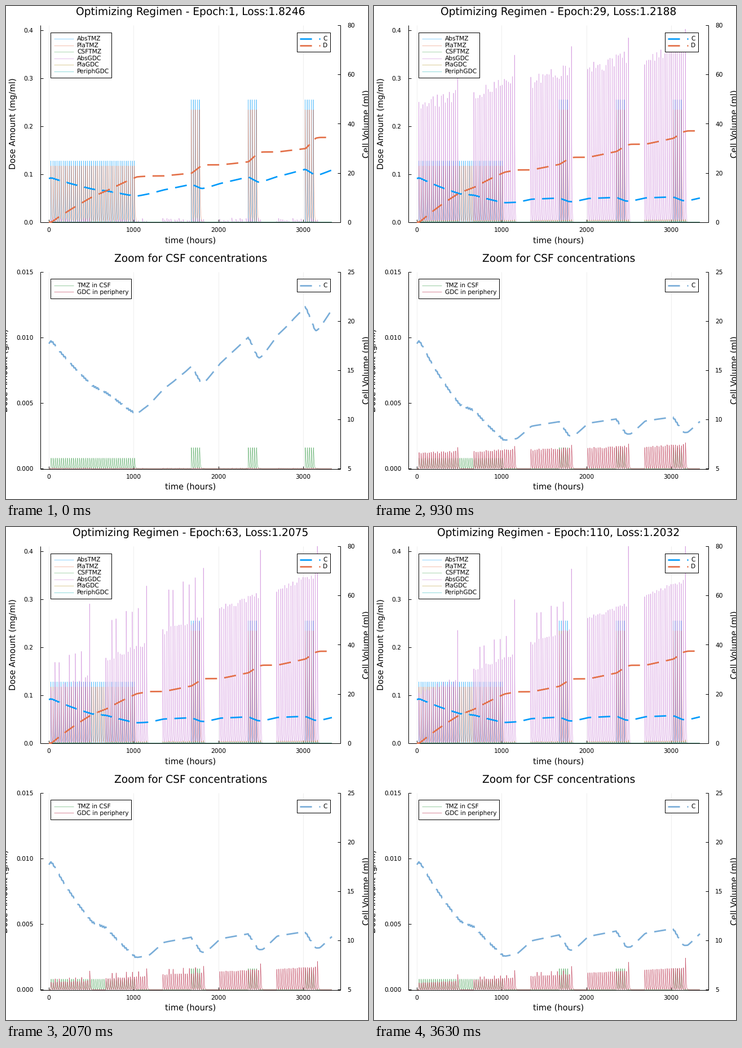
These frames come from a looping animation (642x873 px, 3660 ms). A matplotlib script:

```python
import numpy as np
import matplotlib as mpl
import matplotlib.pyplot as plt
from matplotlib.animation import FuncAnimation
from matplotlib.patches import Rectangle

W, H, DPI = 642, 873, 96
STEP, FRAMES = 20, 183            # ms per frame, frames per loop
N_EPOCHS = 110
LEFT, RIGHT = 61, 593
TOP_Y = (34.2, 382.7)
LOW_Y = (470.7, 819.2)
XLIM = (-100.2, 3440.2)
THIN = 0.5
DASH = (0, (7.9, 4.85))

BLUE, ORANGE, GREEN, PURPLE, OLIVE, TEAL = PALETTE = [
    "#009afa", "#e36f47", "#3ea44e", "#c371d2", "#ac8e18", "#00aaae"]
STEEL, TMZ_GREEN, GDC_RED = "#79add8", "#65b171", "#c55068"
DRUGS = ["AbsTMZ", "PlaTMZ", "CSFTMZ", "AbsGDC", "PlaGDC", "PeriphGDC"]
FADE = 0.65                       # opacity of the concentration lines

mpl.rcParams["font.family"] = "DejaVu Sans"
mpl.rcParams["text.hinting"] = "none"

# ---- dosing schedule (hours): TMZ daily, then short double-dose courses ----
DAY, MONTH = 24, 672
TMZ_T = np.concatenate([DAY * np.arange(1, 43)] +
                       [MONTH * k + 336 + DAY * np.arange(5) for k in (2, 3, 4)])
TMZ_H = np.where(TMZ_T < 1100, 1.0, 2.0)
CYCLE, DAY_NO = (a.ravel()[1:] for a in np.indices((5, 21)))
GDC_T = MONTH * CYCLE + DAY * DAY_NO
LAST = DAY_NO == 20
HELD = np.isin(DAY_NO, (3, 5, 10, 13, 16)) & (CYCLE < 3)   # days reduced later

rng = np.random.default_rng(7)
FIRST_GUESS = rng.uniform(0, 0.009, CYCLE.size)
NOISE = rng.uniform(-1, 1, CYCLE.size)


def fall(e, start, span):
    return np.exp(-np.maximum(e - start, 0) / span)


def gdc_heights(e):
    """All doses: a quick common rise, then early cycles are cut back."""
    grow = 1 - (1 - min((e - 1) / 16, 1)) ** 1.5
    over = np.clip((e - 17) / 12, 0, 1)
    plateau = 0.25 - 0.012 * over + (0.012 + 0.014 * over) * CYCLE
    final = 0.10 + 0.05 * CYCLE
    h = final + (plateau - final) * fall(e, 29, 12 + 10 * CYCLE)
    h += 0.03 * DAY_NO / 20
    h += HELD * 0.09 * np.clip((e - 29) / 20, 0, 1) * fall(e, 53, 20 + 60 * CYCLE)
    h += NOISE * (0.004 + 0.015 * np.exp(-((e - 40) / 18) ** 2))
    keys = (17, 29, N_EPOCHS)
    peak = np.interp(e, keys, (.28, .33, .235)) + np.interp(e, keys, (.01, .018, .064)) * CYCLE
    h = np.where(LAST, peak, h)
    return FIRST_GUESS + (h - FIRST_GUESS) * grow


EPOCHS = np.arange(1, N_EPOCHS + 1)
DOSES = np.array([gdc_heights(e) for e in EPOCHS])


def loss_at(e):
    if e < 17:
        return 1.217 + 0.6076 * (1 - (e - 1) / 16) ** 3
    return np.interp(e, (17, 29, 53, 74, 88, 110),
                     (1.217, 1.2188, 1.2091, 1.2057, 1.2045, 1.2032))


# ---- cell volumes: GDC slows growth, TMZ kills ----
DT_SIM = 4
HOURS = np.arange(0, 3341, DT_SIM)


def active(times, levels):
    """Level of the dose given within the last day, per hour step."""
    k = np.searchsorted(times, HOURS, side="right") - 1
    on = (k >= 0) & (HOURS - times[k] < DAY)
    return np.where(on, levels[..., k], 0)


def simulate():
    kill_rate = active(TMZ_T, 0.00108 * TMZ_H ** 0.5)
    block = active(GDC_T, np.minimum(0.8 * (DOSES / 0.26) ** 0.22, 0.9))
    c, d = np.full(N_EPOCHS, 17.7), np.zeros(N_EPOCHS)
    k = b = 0
    cs, ds = [], []
    for i in range(len(HOURS)):
        cs.append(c)
        ds.append(d)
        k = k + 0.35 * (kill_rate[i] - k)
        b = b + 0.35 * (block[:, i] - b)
        growth = 0.00184 * c ** 0.65
        lost = k * c + b * growth
        c = c + DT_SIM * (growth - lost)
        d = d + DT_SIM * 1.04 * lost
    phase = HOURS % DAY / DAY
    ripple = (kill_rate > 0) * np.minimum(3 * phase, 1.5 * (1 - phase))
    return np.array(cs).T - 0.143 * ripple, np.array(ds).T


ALIVE, DEAD = simulate()

# ---- concentration pulses ----
DT = np.array([0, .3, .7, 1.2, 2, 3, 4.5, 6.5, 9, 12, 16, 20, 23.8, 30, 40])


class Pulses:
    """Polyline with one rise and decay for every dose."""

    def __init__(self, times, rise, tau):
        nxt = np.append(times[1:], 1e6)
        t = times[:, None] + DT
        self.keep = t < nxt[:, None]
        self.x = np.concatenate([[0], t[self.keep], [3340]])
        s = np.exp(-DT / tau) - np.exp(-DT / rise)
        self.shape = s / s.max()

    def y(self, heights):
        v = heights[:, None] * self.shape
        return np.concatenate([[0], v[self.keep], [0]])


# ---- layers ----
fig = plt.figure(figsize=(W / DPI, H / DPI), dpi=DPI, facecolor="white")


def layer(x0, x1, y0, y1, xlim, ylim):
    ax = fig.add_axes([x0 / W, 1 - y1 / H, (x1 - x0) / W, (y1 - y0) / H])
    ax.set(xlim=xlim, ylim=ylim)
    ax.set_axis_off()
    return ax


def page():
    return layer(0, W, 0, H, (0, W), (H, 0))


def panel(span, ylim):
    return layer(LEFT, RIGHT, *span, XLIM, ylim)


back = page()
top_l, top_r = panel(TOP_Y, (0, 0.41)), panel(TOP_Y, (0, 80))
low_l, low_r = panel(LOW_Y, (0, 0.015)), panel(LOW_Y, (5, 25))
front = page()


def stroke(ax, x, y, color, lw=0.75, **kw):
    return ax.plot(x, y, color=color, lw=lw, solid_capstyle="butt",
                   dash_capstyle="butt", **kw)[0]


def text(x, y, s, size=8, ha="left", rotation=0):
    return front.text(x, y, s, size=size, ha=ha, va="baseline",
                      rotation=rotation, rotation_mode="anchor")


def y_ticks(x, d, ticks, ylim, span, fmt, label_x, ha):
    for v in ticks:
        y = np.interp(v, ylim, span[::-1])
        stroke(back, [x, x + d], [y, y], "black")
        text(label_x, y + 4, fmt % v, ha=ha)


def frame(span, left, right, fmt, label, label_x):
    """Axis lines, grid, ticks and labels; left and right are (axes, ticks)."""
    y0, y1 = span
    mid, base = (y0 + y1) / 2, int(y1) + 1
    for t in range(0, 4000, 1000):
        x = np.interp(t, XLIM, (LEFT, RIGHT))
        stroke(back, [x, x], [y0, y1], "#eeeeee")
        stroke(back, [x, x], [base, base - 5], "black")
        text(x, y1 + 17.3, str(t), ha="center")
    stroke(back, [LEFT, RIGHT], [base, base], "black")
    for x in (LEFT, RIGHT):
        stroke(back, [x, x], [y0, base], "black")
    y_ticks(LEFT, 5, left[1], left[0].get_ylim(), span, fmt, 48.5, "right")
    y_ticks(RIGHT, -5, right[1], right[0].get_ylim(), span, "%d", 605, "left")
    text(327.3, y1 + 37.3, "time (hours)", 11, "center")
    text(label_x, mid, label, 11, "center", 90)
    text(643.7, mid, "Cell Volume (ml)", 11, "center", 90)


def legend(x, y, w, entries, lw=THIN, ls="-", x0=6, alpha=1):
    h = 11.5 * (len(entries) + 1)
    front.add_patch(Rectangle((x, y), w, h, fc="white", ec="black", lw=0.75))
    for i, (name, color) in enumerate(entries):
        cy = y + 11.5 * (i + 1)
        stroke(front, [x + x0, x + 41], [cy, cy], color, lw, ls=ls, alpha=alpha)
        text(x + x0 + 41, cy + 3.2, name)


frame(TOP_Y, (top_l, np.arange(5) / 10), (top_r, range(0, 81, 20)), "%.1f",
      "Dose Amount (mg/ml)", 16.5)
frame(LOW_Y, (low_l, np.arange(4) / 200), (low_r, range(5, 26, 5)), "%.3f",
      "Dose Amount (g/ml)", 3)

legend(79, 46.6, 108, zip_entries := list(zip(DRUGS, PALETTE)), alpha=FADE)
legend(79, 483.1, 143, [("TMZ in CSF", TMZ_GREEN), ("GDC in periphery", GDC_RED)])
legend(516, 46.6, 59, [("C", BLUE), ("D", ORANGE)], 2, DASH, 5)
legend(516, 483.1, 59, [("C", STEEL)], 2, DASH, 5)

title = text(327.3, 16.4, "", 14, "center")
text(327.3, 453.2, "Zoom for CSF concentrations", 14, "center")

# ---- data lines ----
csf_tmz = Pulses(TMZ_T, 1.5, 5.5)
abs_gdc = Pulses(GDC_T, 0.05, 4.0)
pla_gdc = Pulses(GDC_T, 0.6, 6.0)
per_gdc = Pulses(GDC_T, 1.2, 5.0)


def trace(ax, pulses, color, heights, alpha=FADE):
    return stroke(ax, pulses.x, pulses.y(heights), color, THIN, alpha=alpha,
                  clip_on=color == PURPLE)


trace(top_l, Pulses(TMZ_T, 0.05, 1.0), BLUE, 0.1275 * TMZ_H)
trace(top_l, Pulses(TMZ_T, 0.3, 6.0), ORANGE, 0.117 * TMZ_H)
trace(top_l, csf_tmz, GREEN, 0.0008 * TMZ_H)
trace(low_l, csf_tmz, TMZ_GREEN, 0.0008 * TMZ_H, 1)

# line, its pulse shape, height relative to the dose
GDC_LINES = [(trace(ax, p, color, DOSES[0], alpha), p, scale)
             for ax, p, color, scale, alpha in (
                 (top_l, abs_gdc, PURPLE, 1, FADE),
                 (top_l, pla_gdc, OLIVE, 0.014, FADE),
                 (top_l, per_gdc, TEAL, 0.0049, FADE),
                 (low_l, per_gdc, GDC_RED, 0.0049, 1))]
VOLUMES = [(stroke(ax, HOURS, v[0], color, 2, ls=DASH, clip_on=False), v)
           for ax, v, color in ((top_r, ALIVE, BLUE), (top_r, DEAD, ORANGE),
                                (low_r, ALIVE, STEEL))]


def update(i):
    t = STEP * i + STEP / 2
    epoch = 1 + int((t / 10 + 0.5) * 0.3)     # 30 epochs per second
    for line, pulses, scale in GDC_LINES:
        line.set_ydata(pulses.y(scale * DOSES[epoch - 1]))
    for line, values in VOLUMES:
        line.set_ydata(values[epoch - 1])
    loss = round(float(loss_at(epoch)), 4)
    title.set_text(f"Optimizing Regimen - Epoch:{epoch}, Loss:{loss}")
    return [title]


anim = FuncAnimation(fig, update, frames=FRAMES, interval=STEP,
                     repeat=True, repeat_delay=0, blit=False)
plt.show()
```
